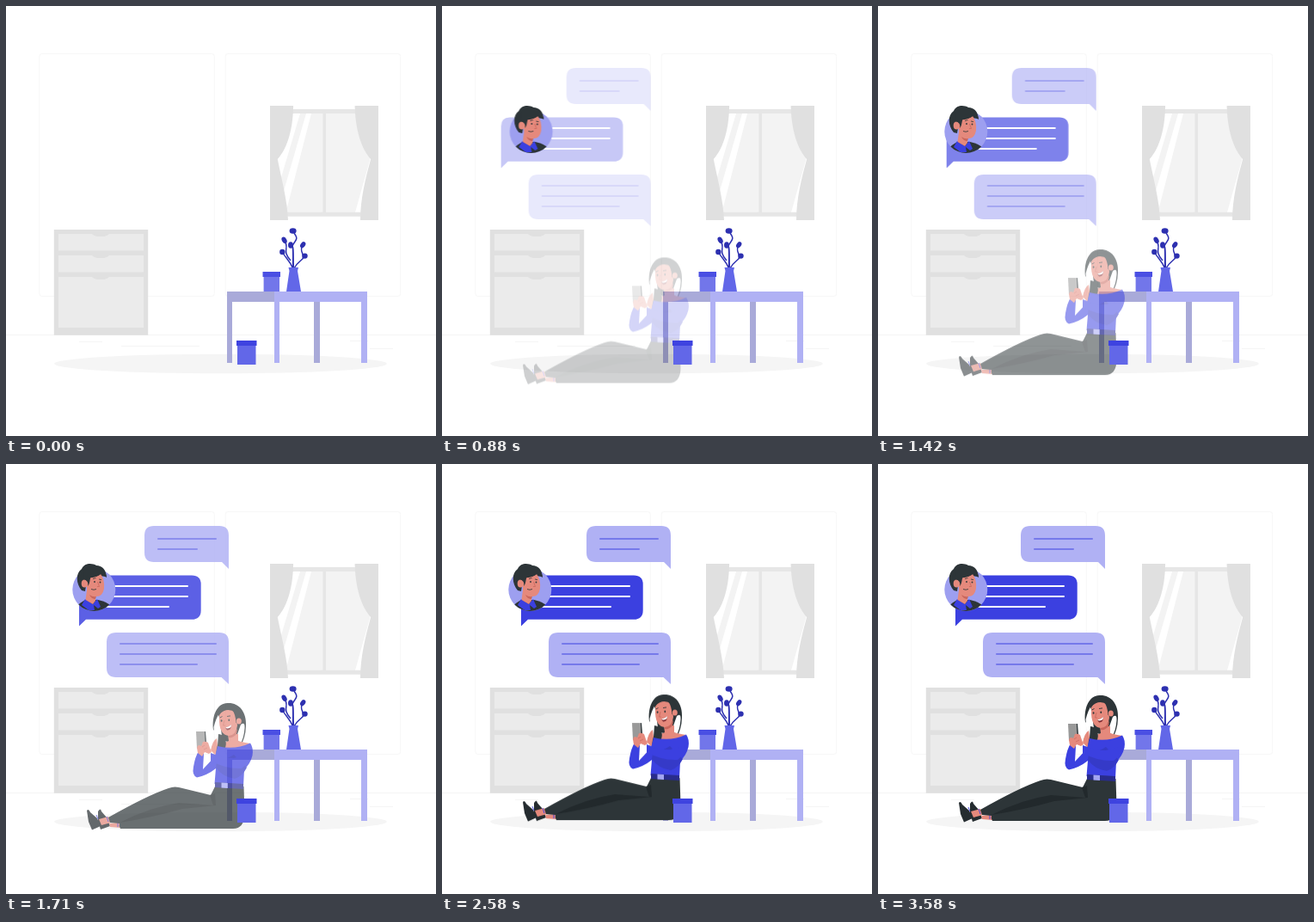
These frames come from a looping animation (500 px wide and 500 px high, 3620 ms). An HTML page:

```html
<!DOCTYPE html>
<html lang="en">
<head>
<meta charset="utf-8">
<title>Chatting at home</title>
<style>
  html, body { margin: 0; width: 100%; height: 100%; overflow: hidden; background: #fff; }
  svg { display: block; width: 100vw; height: 100vh; }
  .main { fill: #3b40e0; }
  .pale { fill: #b0b1f4; }
  .dim { fill: #a9aad9; }
  .mid { fill: #6267e8; }
  .ink { fill: #2d3538; }
  .skin { fill: #e5897c; }
  .grey { fill: #e0e0e0; }
  .light { fill: #ebebeb; }
  .rail { fill: #e6e6e6; }
  .white { fill: #fff; }
  .line { fill: none; stroke-width: 2; stroke-linecap: round; }
  .stem { fill: none; stroke: #2d30b0; stroke-width: 1.5; }
  .leaf { fill: #2d30b0; }
</style>
</head>
<body>
<svg viewBox="0 0 500 500">
  <defs>
    <clipPath id="disc"><circle cx="102.3" cy="146" r="25"/></clipPath>
  </defs>

  <g id="room">
    <g fill="none" stroke="#f7f7f7">
      <rect x="38.8" y="55.5" width="203.5" height="282" rx="3"/>
      <rect x="255.2" y="55.5" width="203.5" height="282" rx="3"/>
      <path d="M0 382.5H500M134 395.5H225M85 390.5H112M423 398.5H450M400 389.5H421" stroke="#f5f5f5"/>
    </g>
    <ellipse cx="249.5" cy="416" rx="193.5" ry="11.3" fill="#f5f5f5"/>

    <rect class="grey" x="55.8" y="260" width="109.4" height="122.8"/>
    <path class="light" d="M61 265h99v19.5h-99zM61 290h99v19.6h-99zM61 315h99v59h-99z"/>
    <path class="grey" d="M100 265h20q-3 3-6 3h-8q-3 0-6-3zM100 290h20q-3 3-6 3h-8q-3 0-6-3zM100 315h20q-3 3-6 3h-8q-3 0-6-3z"/>

    <rect x="316" y="125" width="108" height="115" fill="#f3f3f3"/>
    <path class="white" d="M331 125H342L318 206 314 178zM349 125H355L327 234 323 215zM424 176L406 240H414L425 180z"/>
    <path class="rail" d="M325 120h90v5h-90zM325 239.7h90v5h-90zM368.5 125h3.5v115h-3.5z"/>
    <path class="grey" d="M307 116H334C334 140 328 165 315.8 178C320 200 327 225 328 249H307zM433 116H405.600C406 140 412 165 424.200 178C418 200 412 225 412 249H433z"/>

    <path class="dim" d="M257 332h55v12h-49v71h-6zM358 344h7v71h-7z"/>
    <path class="pale" d="M312 332h108v83h-7v-71h-95v71h-6z"/>
    <path fill="#7276ea" d="M299.600 314h18.400v18h-18.400z"/>
    <path fill="#4a4fe3" d="M298.500 309h20.500v6h-20.500z"/>

    <path class="stem" d="M333.500 305C334 285 334 282 333 279C336 272 341 272 335 264M333.500 305C330 296 325 293 322 287M335 305C340 296 345 296 347 291M331 296C320 284 330 282 324 273M345 294C348 288 340 286 345 278"/>
    <path class="stem" d="M334.500 305C333.500 295 334.500 288 333.500 280" stroke-width="2"/>
    <g class="leaf">
      <ellipse cx="333.6" cy="261.500" rx="4" ry="3.300"/>
      <ellipse cx="323.600" cy="272.300" rx="2.700" ry="4" transform="rotate(-30 323.600 272.300)"/>
      <ellipse cx="331" cy="278" rx="3" ry="3.800"/>
      <ellipse cx="345.200" cy="277.800" rx="2.700" ry="3.900" transform="rotate(35 345.200 277.800)"/>
      <circle cx="321.300" cy="286" r="3.200"/>
      <circle cx="347.500" cy="290.600" r="3.200"/>
    </g>
    <path class="mid" d="M328.500 304h11.500l-1 4 4 24h-17l3.500-24z"/>
  </g>

  <g id="chat">
    <g class="pale">
      <path d="M177 72H253Q264 72 264 83V122L256 114H177Q166 114 166 103V83Q166 72 177 72z"/>
      <path d="M133 196H253Q264 196 264 207V256L255.500 248H133Q122 248 122 237V207Q122 196 133 196z"/>
    </g>
    <path class="main" d="M90 140Q90 129.500 100 129.500H221Q231.700 129.500 231.700 140V170Q231.700 180.800 221 180.800H98L90 188.500z"/>
    <path class="line" stroke="#7679ea" d="M182 87H249M182 99H227M138 209H249M138 221H249M138 233H227"/>
    <path class="line" stroke="#fff" d="M112 142H216M112 154H216M112 166H194"/>
  </g>

  <g id="friend">
    <circle cx="102.300" cy="146" r="25" fill="#9d9ff0"/>
    <g clip-path="url(#disc)">
      <path class="ink" d="M81 167Q86 161 92 158L107 158Q117 160 122 165V172H81z"/>
      <path class="main" d="M88 164L92 157 101 163 106 157 110 166 107 168 102 164 103 170H96z"/>
    </g>
    <path class="ink" d="M88 147C82 140 80 128 88 122C91 115 100 115 105 118C112 118 117 124 116.500 131L108 130 94 136 92 148z"/>
    <path class="skin" d="M94 132Q104 133 110 128Q115 134 114 145Q112 155 104 154L104 159 101 163 92.500 158 94 147z"/>
    <path d="M97 152Q101 155 105 154L104 157Q99 157 97 152z" fill="#c9665c"/>
    <ellipse class="skin" cx="91.300" cy="139" rx="3.600" ry="4.500"/>
    <path class="ink" d="M90 134C95 135 96 139 95 142C98 139 97 134 99 131Q107 132 111 127Q114 131 117 132C117 126 112 121 106 119L91 121z"/>
    <g class="ink"><circle cx="103" cy="137" r=".9"/><circle cx="109.500" cy="137.500" r=".9"/></g>
    <path d="M101 133.500l3.500-1M108 134l3 .6M99 145.500Q102 147 105 145.500" fill="none" stroke="#2d3538" stroke-width=".8"/>
    <path d="M106.500 137L108.500 142.500H106" fill="none" stroke="#c9665c" stroke-width=".8"/>
  </g>

  <g id="woman">
    <path class="ink" d="M241 300C239 283 246 268.500 258 269C271 268.500 280 279 279 296Q278.500 310 272 320L255 313 246 304z"/>
    <path class="white" d="M241.500 297Q244 287 248 281L251 308 247 317Q241.500 310 241.500 297zM273 294Q278 290 277.500 298Q276.500 311 272 317L268 308z"/>
    <path class="skin" d="M238 324Q240 313 245 310L246 318 259 313 258 305H270V313Q277 315 284 316L280 332H246z"/>
    <path d="M259 305Q265 305 269 299L268 305Q264 310 259 309z" fill="#c9665c"/>
    <path class="skin" d="M248 282Q257 273 267 280L269 295Q268 306 259 307Q249 306 248 291z"/>
    <path class="ink" d="M247 286C249 278 256 275 263 277Q267 282 267.500 292L272 293Q275 282 268 275Q256 268 247 279z"/>
    <ellipse class="skin" cx="270.800" cy="290" rx="3" ry="3.600"/>
    <path class="ink" d="M247 305Q252 305 255 311Q257 317 254 323Q252 332 246 334Q243 326 246 318z"/>
    <g class="ink"><ellipse cx="250.600" cy="289.500" rx=".9" ry="1.300"/><ellipse cx="259.300" cy="288.700" rx=".9" ry="1.300"/></g>
    <path d="M248.500 286l3-1.500M257 284.500l4-.6" fill="none" stroke="#2d3538" stroke-width=".9"/>
    <path d="M254 289L252.500 295H255" fill="none" stroke="#c9665c" stroke-width=".8"/>
    <path d="M255 297.500Q259 297 262 294Q262 301 257 300.500z" fill="#832f35"/>
    <path class="white" d="M255 297.500Q259 297 262 294L261.500 297Q258 299.500 255 297.500z"/>

    <path d="M94 394Q96 391 98 396L106 403 110 412 100 416.500 96 407zM107 395Q110 390 111 395L117 402 121 412 110 416 107 406z" fill="#252c30"/>
    <path class="skin" d="M108 404L119 401 122 408 111 411zM120 409L132 408 133 414 121 413z"/>
    <path d="M105 399L107 404M117 401L119 407M130 408V413" fill="none" stroke="#3b40e0" stroke-width=".9"/>
    <path class="ink" d="M119 402Q165 376 189 368Q195 365.500 201 367L238 376 243 366H276.500L277.500 398Q277 415 264 415H133Q131 412 132 409L121 408z"/>
    <path d="M132 408Q167 390 201 385L241 388 237 376 243 374 244 388 205 392Q170 402 132 408z" fill="#22292c"/>

    <path class="main" d="M246 319Q266 324 284 315.500Q288 321 286.500 330Q284 340 277 346L276 366 242.500 363 244 345Q234 353 222 355.500Q216 353 218 343Q220 331 224 325L230 328 229 346 243 331z"/>
    <path d="M245 338Q257 334 265 329L280 344Q275 354 266 357Q252 355 244 344z" fill="#353ac8"/>
    <path class="main" d="M238 327Q253 333 265 333L282 328Q284 338 274 345Q256 346 238 336z"/>
    <path d="M243 361L276 363V369L243 367z" fill="#292c8c"/>
    <path d="M250.500 361.500L258 362V368L250.500 367.500z" fill="#a3a5f2"/>

    <path d="M230.500 302L232 302 233.500 320 230 323z" fill="#2d3538"/>
    <path d="M221 302H230.800L232 322H222z" fill="#999"/>
    <path class="skin" d="M222 321Q223 316 227 319L229 314Q232 313 235 315L237 321 239 326 236 328 231 326 228 331 223 327z"/>
    <path d="M228 320L231 318M230 323L234 321" stroke="#c9665c" stroke-width=".7"/>
  </g>

  <path class="mid" d="M269 394h21.500v23h-21.500z"/>
  <path fill="#3e43e0" d="M268 389h23.500v6h-23.500z"/>
</svg>
<script>
  const LOOP = 3620;
  const EASE = 'cubic-bezier(.36, -.01, .5, 1.38)';

  // Each part fades in while sliding 30 px, then rests until the loop ends.
  const enter = (id, from, time) => {
    const rest = { opacity: 1, transform: 'translate(0, 0)' };
    document.getElementById(id).animate([
      { opacity: 0, transform: `translate(${from})`, easing: EASE },
      { ...rest, offset: time / LOOP },
      rest
    ], { duration: LOOP, iterations: Infinity });
  };

  enter('friend', '-30px, 0px', 950);
  enter('chat', '-30px, 0px', 3115);
  enter('woman', '0px, 30px', 3580);
</script>
</body>
</html>
```
